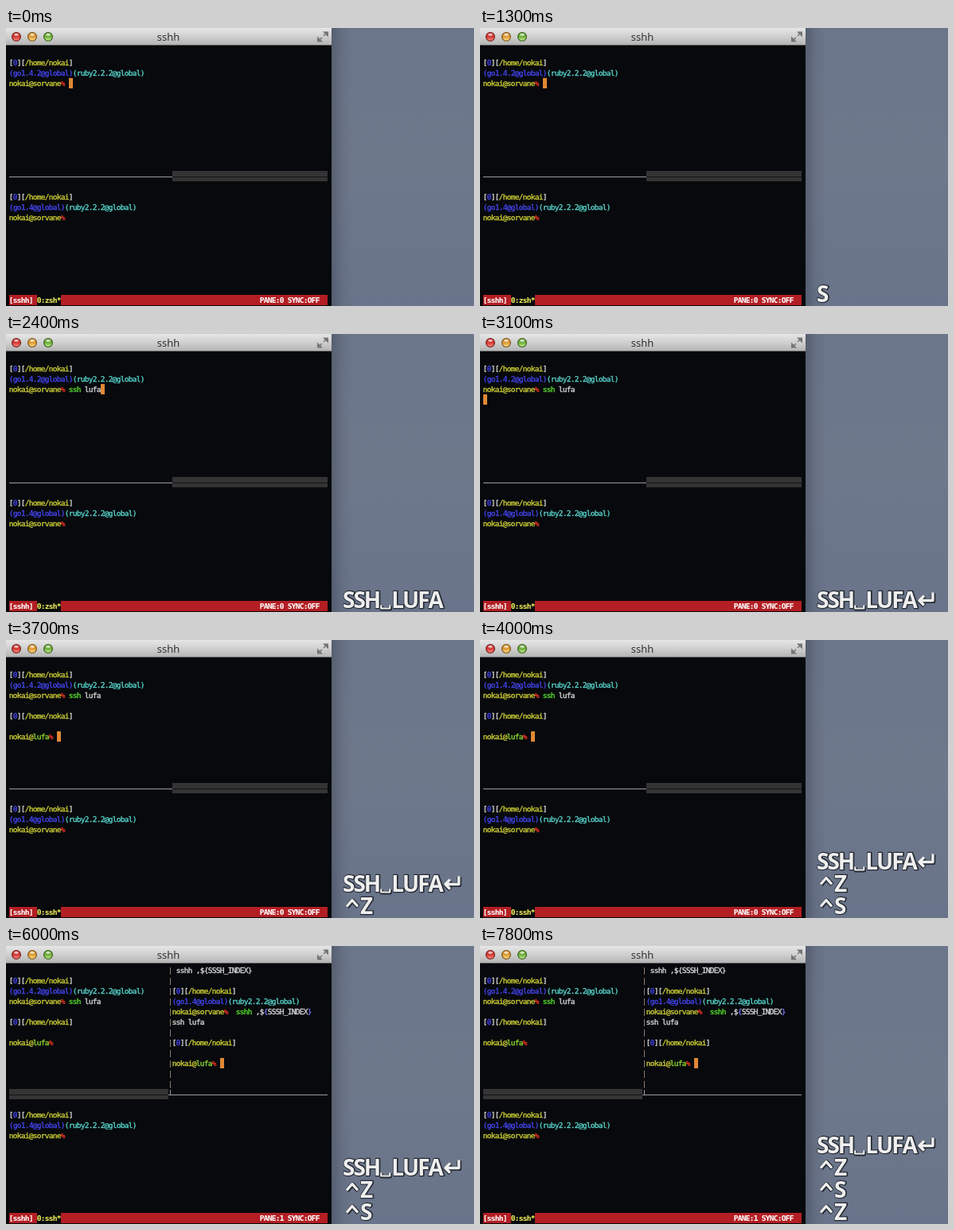
An HTML page with a canvas that plays this animation: 588 px wide and 350 px high, repeating every 8000 ms.

```html
<!DOCTYPE html>
<html lang="en">
<head>
<meta charset="utf-8">
<title>sshh</title>
<style>
html, body { margin: 0; width: 588px; height: 350px; overflow: hidden; }
canvas { display: block; }
</style>
</head>
<body>
<canvas id="stage" width="588" height="350"></canvas>
<script>
const ctx = document.getElementById('stage').getContext('2d');
const LOOP = 8000, LEFT = 4, TOP = 24, CELL_W = 5, CELL_H = 13, RIGHT_PANE = 41;
const USER = 'nokai', HOST = 'sorvane', REMOTE = 'lufa';
const COMMAND = 'ssh ' + REMOTE;
const KEY_TIMES = [1300, 1400, 1700, 1800, 2000, 2100, 2200, 2300, 2700];
const ECHO_DELAY = 100;
const white = '#d8d8d8', blue = '#4545f0', yellow = '#cfd036', cyan = '#58d6cd',
      red = '#dc2f20', green = '#58e02e', black = '#07090c', lineGray = '#9c9c9c';

const rect = (color, x, y, w, h) => { ctx.fillStyle = color; ctx.fillRect(x, y, w, h); };
const keysBefore = t => KEY_TIMES.filter(k => k <= t).length;

function gradient(x0, y0, x1, y1, ...colors) {
  const g = ctx.createLinearGradient(x0, y0, x1, y1);
  colors.forEach((c, i) => g.addColorStop(i / (colors.length - 1), c));
  return g;
}

// Writes [text, color] runs on the terminal grid, slightly emboldened.
function put(col, row, runs, weight = 'normal') {
  ctx.font = `${weight} 9.5px "DejaVu Sans Mono", monospace`;
  ctx.textAlign = 'center';
  ctx.lineWidth = weight === 'bold' ? 0.1 : 0.35;
  for (const [text, color] of runs) {
    ctx.fillStyle = ctx.strokeStyle = color;
    for (const ch of text) {
      const x = LEFT + (col + 0.5) * CELL_W, y = TOP + row * CELL_H + 10;
      ctx.fillText(ch, x, y);
      ctx.strokeText(ch, x, y);
      col++;
    }
  }
}

function cell(color, col, row, cols = 1) {
  rect(color, LEFT + col * CELL_W, TOP + row * CELL_H, cols * CELL_W, CELL_H);
}
const cursor = (col, row) => cell('#df8836', col, row);

function pathLine(col, row) {
  put(col, row, [['[', white], ['0', blue], ['][', white], ['/home/' + USER, yellow], [']', white]]);
}

function localPrompt(col, row, go) {
  pathLine(col, row);
  put(col, row + 1, [[`(go${go}@global)`, blue], ['(ruby2.2.2@global)', cyan]]);
  put(col, row + 2, [[`${USER}@${HOST}`, yellow], ['%', red]]);
}

function remotePrompt(col, row) {
  put(col, row, [[USER + '@', yellow], [REMOTE, '#8fdc30'], ['%', red]]);
}

function drawDesktop() {
  rect(gradient(0, 0, 0, 350, '#6b768a', '#6e788b', '#69748a'), 0, 0, 588, 350);
  rect(gradient(409, 0, 435, 0, 'rgba(30,35,45,.28)', 'rgba(30,35,45,.08)', 'rgba(30,35,45,0)'), 409, 0, 26, 350);
}

function drawWindow() {
  rect(black, 0, 22, 409, 328);
  rect(gradient(0, 0, 0, 22, '#e6e6e6', '#cfcfcf', '#b2b2b2'), 0, 0, 409, 22);
  rect('#6a6a6a', 0, 21, 409, 1);
  [['#ff8a80', '#d23a35', '#7c2320'], ['#ffe08a', '#dc9a35', '#80571c'], ['#c4ee8e', '#6fae3c', '#3d661f']]
    .forEach(([glow, body, edge], i) => {
      const x = 13 + 20 * i;
      ctx.beginPath();
      ctx.arc(x, 11, 5.4, 0, 7);
      ctx.fillStyle = gradient(0, 6, 0, 16, body, body, glow);
      ctx.fill();
      ctx.strokeStyle = edge;
      ctx.lineWidth = 1.2;
      ctx.stroke();
      ctx.beginPath();
      ctx.ellipse(x, 8.3, 2.8, 1.6, 0, 0, 7);
      ctx.fillStyle = 'rgba(255,255,255,.65)';
      ctx.fill();
    });
  ctx.font = '13px "Open Sans", sans-serif';
  ctx.textAlign = 'center';
  ctx.fillStyle = '#262626';
  ctx.fillText('sshh', 204, 16);
  ctx.strokeStyle = ctx.fillStyle = '#747474';
  ctx.lineWidth = 1.5;
  ctx.stroke(new Path2D('M399 10L403 6M397 12L393 16'));
  ctx.fill(new Path2D('M398 4.5H405V11.5ZM391 10.5V17.5H398Z'));
}

function drawBorders(split) {
  const [blockCol, blockSize, lineCol, lineSize] = split ? [0, 40, 40, 40] : [41, 39, 0, 41];
  cell('#343434', blockCol, 12, blockSize);
  rect('#121314', LEFT + blockCol * CELL_W, 187, blockSize * CELL_W, 1);
  rect(lineGray, LEFT + lineCol * CELL_W, 187, lineSize * CELL_W, 1);
  if (!split) return;
  for (let row = 0; row < 12; row++) rect('#8f7b70', 206, TOP + row * CELL_H + 3, 1, 9);
  rect(lineGray, 206, 181, 1, 6);
}

function drawLeftPane(t, split) {
  localPrompt(0, 1, '1.4.2');
  const typed = COMMAND.slice(0, keysBefore(t - ECHO_DELAY));
  put(15, 3, [[typed.slice(0, 3), typed.length > 1 ? green : red], [typed.slice(3), white]]);
  if (t >= 3300) {
    pathLine(0, 5);
    remotePrompt(0, 7);
  }
  if (split) return;
  if (t >= 3300) cursor(12, 7);
  else if (t >= 2800) cursor(0, 4);
  else cursor(15 + typed.length, 3);
}

function drawRightPane(t) {
  const col = RIGHT_PANE, index = '${SSSH_INDEX}';
  put(col, 0, [[' sshh ,' + index, white]]);
  if (t < 4900) return cursor(col, 1);
  localPrompt(col, 2, '1.4');
  put(col + 16, 4, [['sshh', green], [' ,$', white], ['{', '#7474f0'], ['SSSH_INDEX', white], ['}', '#7474f0']]);
  put(col, 5, [[COMMAND, white]]);
  if (t >= 5500) pathLine(col, 7);
  if (t < 5600) return cursor(col, t < 5500 ? 6 : 8);
  remotePrompt(col, 9);
  cursor(col + 12, 9);
}

function drawStatus(t, split) {
  const process = (t >= 3000 && t < 4100) || t >= 5000 ? 'ssh' : 'zsh';
  cell('#b31e23', 0, 24, 80);
  cell(black, 7, 24, 6);
  put(0, 24, [['[sshh]', '#fff']], 'bold');
  put(7, 24, [[`0:${process}*`, '#f3f05a']], 'bold');
  put(63, 24, [[`PANE:${split ? 1 : 0} SYNC:OFF`, '#fff']], 'bold');
}

// Key symbols that are drawn as strokes: [path from the baseline, advance].
const SYMBOLS = {
  '_': ['M2 -3V1H13V-3', 15],
  '^': ['M5 -9L12 -17L19 -9', 22],
  '↵': ['M21 -19V-9H4M10 -15L4 -9L10 -3', 24]
};

function drawKeys(text, y) {
  ctx.font = 'bold 28px "Open Sans", sans-serif';
  ctx.textAlign = 'left';
  ctx.lineJoin = 'round';
  for (const [outline, ink] of [[2.4, '#262a33'], [0, '#efefef']]) {
    let x = 423;
    ctx.fillStyle = ctx.strokeStyle = ink;
    for (const ch of text) {
      const symbol = SYMBOLS[ch];
      ctx.save();
      ctx.translate(outline ? x + 0.5 : x, outline ? y + 0.7 : y);
      if (symbol) {
        ctx.lineWidth = (ch === '_' ? 2.2 : 3.4) + outline;
        ctx.stroke(new Path2D(symbol[0]));
      } else {
        ctx.lineWidth = outline;
        if (outline) ctx.strokeText(ch, 0, 0);
        ctx.fillText(ch, 0, 0);
      }
      ctx.restore();
      x += symbol ? symbol[1] : ctx.measureText(ch).width - 2;
    }
  }
}

function drawCaption(t) {
  const lines = [(COMMAND.toUpperCase().replace(' ', '_') + '↵').slice(0, keysBefore(t))];
  [[3700, '^Z'], [4000, '^S'], [7800, '^Z']].forEach(([at, keys]) => t >= at && lines.push(keys));
  lines.reverse().forEach((line, i) => drawKeys(line, 344.5 - 28 * i));
}

function draw(now) {
  const t = now % LOOP, split = t >= 4100;
  drawDesktop();
  drawWindow();
  drawBorders(split);
  drawLeftPane(t, split);
  if (split) drawRightPane(t);
  localPrompt(0, 14, '1.4');
  drawStatus(t, split);
  drawCaption(t);
}

const start = performance.now();
function tick() {
  draw(performance.now() - start);
  requestAnimationFrame(tick);
}
tick();
</script>
</body>
</html>
```
